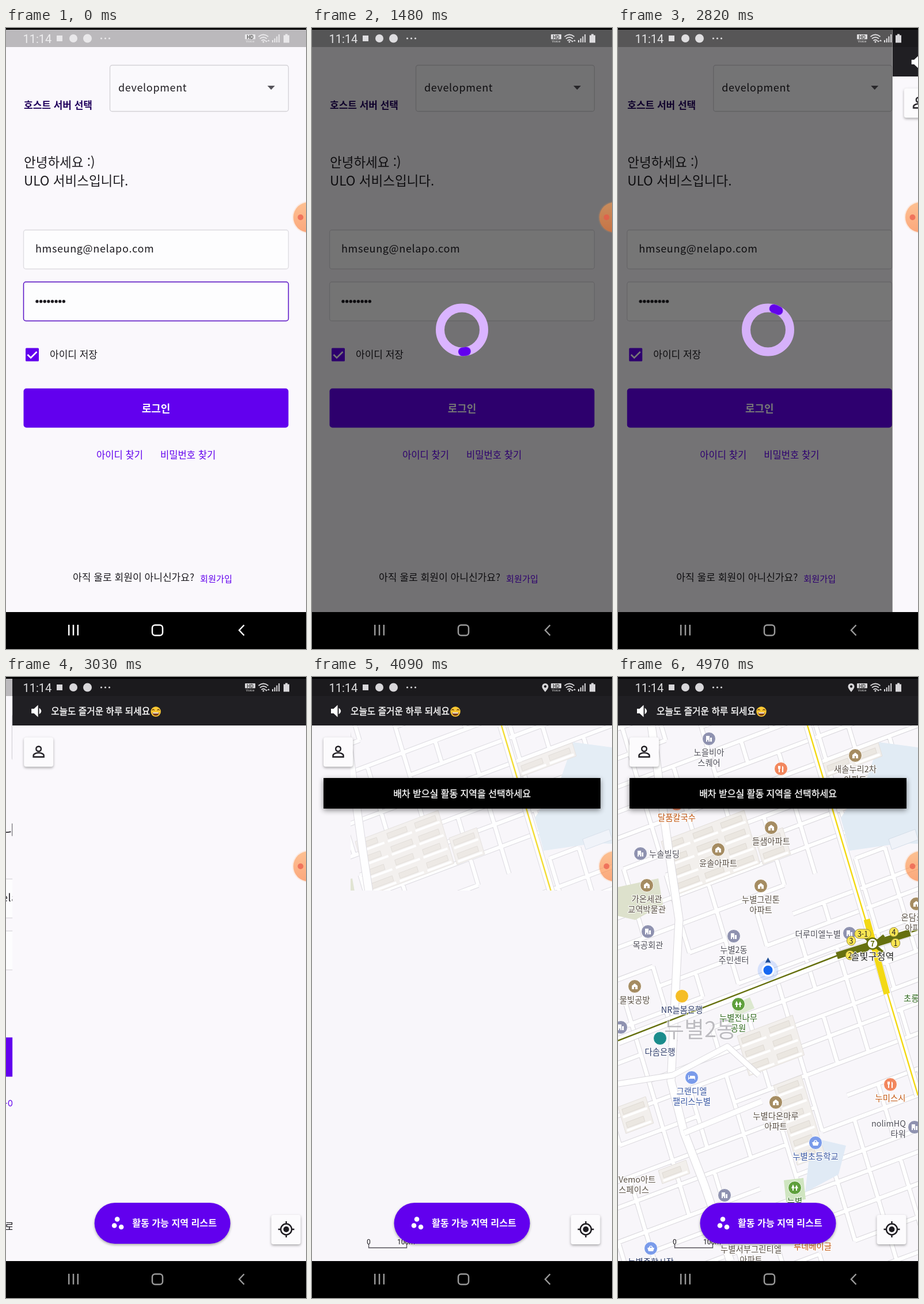
An HTML page that plays this animation: 521x1076 px, repeating every 6.3 s.

```html
<!DOCTYPE html>
<html lang="ko">
<head>
<meta charset="utf-8">
<title>Login</title>
<style>
html, body { margin: 0; width: 100%; height: 100%; overflow: hidden; background: #000; }
svg { display: block; width: 100vw; height: 100vh; }
text { font-family: "Noto Sans CJK KR", "Noto Sans CJK JP", "Noto Sans CJK", sans-serif; fill: #1d1b20; }
.mid { text-anchor: middle; }
.b { font-weight: 700; }
.link { fill: #6200ee; font-weight: 500; }
.light { fill: #fff; stroke: #fff; stroke-width: .35px; font-weight: 500; }
.field { fill: #fdfdfe; stroke: #dddbe0; stroke-width: 1.3; }
.card { fill: #fcfbfd; filter: drop-shadow(0 2px 2px #0005); }
.label text { font-size: 14.4px; font-weight: 500; paint-order: stroke; stroke: #fffc; stroke-width: 2.5px; stroke-linejoin: round; }

#login, #home, #dim, #ring, #spin, #arc, #ripple, #focus, #caret, #nav, .late, .pop, #map, #labels, .cover {
  animation: 6300ms linear infinite;
}
#login { animation-name: push-out; }
#home { animation-name: push-in; }
#dim { animation-name: dim; }
#ring { animation-name: ring; }
#spin { animation-name: spin; transform-origin: 260.5px 523px; }
#arc { animation-name: arc; }
#ripple { animation-name: ripple; }
#focus { animation-name: blur; }
#caret { animation-name: caret; }
#nav { animation-name: nav; }
.late { animation-name: late; }
.pop { animation-name: pop; }
#map { animation-name: map; }
#labels { animation-name: labels; }
.cover { animation-name: uncover; fill: #f8f6fa; }

@keyframes push-in {
  0%, 44.619% { transform: translateX(521px); animation-timing-function: cubic-bezier(.35,.91,.33,.97); }
  49.492%, 100% { transform: none; }
}
@keyframes push-out {
  0%, 44.619% { transform: none; animation-timing-function: cubic-bezier(.35,.91,.33,.97); }
  49.492%, 100% { transform: translateX(-173.7px); }
}
@keyframes dim {
  0%, 4.556% { opacity: 0; animation-timing-function: ease; }
  6.937%, 44.444% { opacity: .54; animation-timing-function: cubic-bezier(.75,0,.75,.9); }
  46.825%, 100% { opacity: 0; }
}
@keyframes ring {
  0%, 4.556% { opacity: 0; animation-timing-function: ease-out; }
  6.937%, 44.444% { opacity: 1; animation-timing-function: ease-in; }
  46.825%, 100% { opacity: 0; }
}
@keyframes spin {
  0%, 4.492% { transform: rotate(0deg); }
  26.149% { transform: rotate(305.9deg); }
  26.15% { transform: rotate(575.9deg); }
  47.806%, 100% { transform: rotate(881.8deg); }
}
@keyframes arc {
  0%, 4.492%, 26.15% { stroke-dasharray: 0 360; stroke-dashoffset: 0; animation-timing-function: cubic-bezier(.4,0,.2,1); }
  15.321%, 36.978% { stroke-dasharray: 270 360; stroke-dashoffset: 0; animation-timing-function: cubic-bezier(.4,0,.2,1); }
  26.149%, 47.806%, 100% { stroke-dasharray: 0 360; stroke-dashoffset: -270; }
}
@keyframes ripple {
  0%, 4.556% { r: 70px; opacity: 0; animation-timing-function: ease; }
  8.127% { r: 237px; opacity: .24; }
  10.556%, 100% { r: 237px; opacity: 0; }
}
@keyframes blur {
  0%, 4.556% { opacity: 1; animation-timing-function: cubic-bezier(.4,0,.2,1); }
  7.206%, 100% { opacity: 0; }
}
@keyframes caret { 0%, 1.42% { opacity: 0; } 1.428%, 4.75% { opacity: 1; } 4.76%, 100% { opacity: 0; } }
@keyframes nav { 0%, 17.46% { opacity: 1; } 20.6%, 100% { opacity: .6; } }
@keyframes late { 0%, 55.86% { opacity: 0; } 55.87%, 100% { opacity: 1; } }
@keyframes pop { 0%, 55.6% { opacity: 0; animation-timing-function: ease; } 60%, 100% { opacity: 1; } }
@keyframes map { 0%, 64.9% { opacity: 0; } 64.91% { opacity: .85; } 67.5%, 100% { opacity: 1; } }
@keyframes uncover { 0%, 65.8% { opacity: 1; } 68.2%, 100% { opacity: 0; } }
@keyframes labels { 0%, 72% { opacity: 0; } 78.8%, 100% { opacity: 1; } }
</style>
</head>
<body>
<svg viewBox="0 0 521 1076" preserveAspectRatio="none">
  <defs>
    <clipPath id="btn"><rect x="30.5" y="624.5" width="460" height="68" rx="5"/></clipPath>
    <clipPath id="area"><rect y="84" width="521" height="928"/></clipPath>
    <linearGradient id="peach" x2="0" y2="1">
      <stop stop-color="#ff9e50"/><stop offset="1" stop-color="#fb7026"/>
    </linearGradient>
  </defs>

  <g id="login">
    <rect width="521" height="1012" fill="#faf8fc"/>
    <rect width="521" height="33" fill="#bbb9bc"/>
    <rect x="180.5" y="64.5" width="310" height="80" rx="4" fill="#faf9fc" stroke="#d3d1d6" stroke-width="1.3"/>
    <text x="195" y="110" font-size="18" letter-spacing=".65">development</text>
    <path d="M454 100h13l-6.500 7z" fill="#55535a"/>
    <text class="b" x="31" y="139.500" font-size="17" style="fill:#21005d">호스트 서버 선택</text>
    <text x="31" y="240.500" font-size="22.500">안녕하세요 :)</text>
    <text x="31" y="272.500" font-size="22.500">ULO 서비스입니다.</text>
    <rect class="field" x="30.500" y="350" width="460" height="67.500" rx="4"/>
    <text x="51" y="389" font-size="18" letter-spacing=".65">hmseung@nelapo.com</text>
    <rect class="field" x="30.500" y="440" width="460" height="67.500" rx="4"/>
    <rect id="focus" x="30.500" y="440" width="460" height="67.500" rx="4" fill="none" stroke="#5a10c8" stroke-width="1.500"/>
    <path d="M54 473.700h47" stroke="#1d1b20" stroke-width="5.400" stroke-linecap="round" stroke-dasharray="0 6.620"/>
    <rect id="caret" x="103.500" y="461" width="2" height="24" fill="#6200ee"/>
    <rect x="34" y="554.500" width="23" height="23" rx="1.500" fill="#6200ee"/>
    <path d="M37.500 566l5.500 5.500 10.500-10.500" fill="none" stroke="#fff" stroke-width="2.600"/>
    <text x="76" y="572" font-size="17">아이디 저장</text>
    <g clip-path="url(#btn)">
      <rect x="30" y="624" width="461" height="69" fill="#6200ee"/>
      <circle id="ripple" cx="269" cy="658" r="70" fill="#fff" opacity="0"/>
    </g>
    <text class="mid b" x="260.500" y="665.500" font-size="18" style="fill:#fff">로그인</text>
    <text class="link" x="157" y="746" font-size="16.600">아이디 찾기</text>
    <text class="link" x="268" y="746" font-size="16.600">비밀번호 찾기</text>
    <text x="116" y="957.500" font-size="17.100">아직 울로 회원이 아니신가요?</text>
    <text class="link" x="337" y="959.500" font-size="15.200">회원가입</text>
  </g>

  <rect id="dim" width="521" height="1012" opacity="0"/>
  <g id="ring" fill="none" stroke-width="15" opacity="0">
    <circle cx="260.500" cy="523" r="38" stroke="#dab4ff"/>
    <g id="spin">
      <circle id="arc" cx="260.500" cy="523" r="38" stroke="#6200ee" stroke-linecap="round" pathLength="360" transform="rotate(-90 260.5 523)"/>
    </g>
  </g>

  <g id="home">
    <rect width="521" height="1012" fill="#faf8fc"/>
    <rect class="pop" y="84" width="521" height="928" fill="#f8f6fa"/>
    <g clip-path="url(#area)">
      <g id="map">
        <g id="ground"></g>
        <rect class="cover" y="33" width="67" height="337" style="animation-delay:60ms"/>
        <rect class="cover" x="67" y="370" width="454" height="454"/>
        <rect class="cover" y="370" width="67" height="454" style="animation-delay:120ms"/>
        <rect class="cover" x="67" y="824" width="454" height="188" style="animation-delay:180ms"/>
        <rect class="cover" y="824" width="67" height="188" style="animation-delay:240ms"/>
      </g>
      <g id="labels"></g>
      <g class="pop">
        <path d="M98.500 983v6h66v-6" fill="none" stroke="#55535a" stroke-width="1.400"/>
        <text x="95" y="983" font-size="12" style="font-family:Roboto,sans-serif">0</text>
        <text x="148" y="983" font-size="12" style="font-family:Roboto,sans-serif">100m</text>
      </g>
    </g>
    <rect class="card" x="20" y="104.500" width="51" height="51" rx="4"/>
    <g fill="none" stroke="#1d1b20" stroke-width="2.400">
      <circle cx="45.500" cy="124.500" r="4.300"/>
      <path d="M36.500 138.500v-2.500c0-3 5-4.600 9-4.600s9 1.600 9 4.600v2.500z"/>
    </g>
    <g class="pop">
      <rect x="20" y="175" width="481" height="53" style="filter:drop-shadow(0 3px 5px #0007)"/>
      <text class="mid light" x="260.500" y="208" font-size="16">배차 받으실 활동 지역을 선택하세요</text>
    </g>
    <rect x="142.500" y="911" width="236" height="71" rx="35.500" fill="#6200ee" style="filter:drop-shadow(0 2px 2px #0005)"/>
    <g fill="#fff"><circle cx="182" cy="939.500" r="4.300"/><circle cx="177" cy="950.500" r="4.300"/><circle cx="189" cy="953" r="4.300"/></g>
    <text class="b" x="208" y="952" font-size="16.100" style="fill:#fff">활동 가능 지역 리스트</text>
    <rect class="card" x="449.500" y="932" width="51" height="51" rx="4"/>
    <circle cx="475.500" cy="957" r="5" fill="#1d1b20"/>
    <path d="M485 957a9.500 9.500 0 1 0-19 0a9.500 9.500 0 1 0 19 0M475.500 943v5M475.500 966v5M461.500 957h5M484.500 957h5" fill="none" stroke="#1d1b20" stroke-width="2.400"/>
    <rect width="521" height="84" fill="#201f23"/>
    <rect width="521" height="33" fill="#1b1a1d"/>
    <path d="M33 55h4.500l7-6.500v21l-7-6.500h-4.500zM46.500 53.500q7.500 5.500 0 11z" fill="#fff"/>
    <text class="light" x="67" y="65" font-size="15.700">오늘도 즐거운 하루 되세요</text>
    <circle cx="249" cy="60" r="8.700" fill="#fbc832"/>
    <path d="M242.500 58q2-3.500 4 0M251.500 58q2-3.500 4 0" fill="none" stroke="#6b3f12" stroke-width="1.300"/>
    <path d="M243 61.500h12q-1 5.500-6 5.500t-6-5.500z" fill="#7a3b16"/>
    <path d="M244 61.500h10v1.700h-10z" fill="#fff"/>
  </g>

  <g fill="#efeef0" opacity=".9">
    <text x="29.500" y="25.500" font-size="20" style="font-family:Roboto,sans-serif;fill:#f4f4f5">11:14</text>
    <rect x="88" y="13" width="10" height="10"/>
    <circle cx="117" cy="18" r="7"/>
    <circle cx="141.500" cy="18" r="7.500"/>
    <circle cx="165.500" cy="18" r="1.600"/><circle cx="172.500" cy="18" r="1.600"/><circle cx="179.500" cy="18" r="1.600"/>
    <rect x="415" y="11" width="18" height="8.500" rx="1"/>
    <text class="mid b" x="424" y="18.500" font-size="8.500" style="font-family:Roboto,sans-serif;fill:#555">HD</text>
    <text class="mid" x="424" y="25" font-size="6" style="font-family:Roboto,sans-serif;fill:#eee">Voice</text>
    <path d="M438.500 15q8.500-7 17 0M441 18.500q6-5 12 0M443.500 22q3.500-3 7 0" fill="none" stroke="#efeef0" stroke-width="1.700"/>
    <circle cx="447" cy="24" r="1.500"/>
    <path d="M450 22h4l-2 3zM454 23h4l-2-3z"/>
    <path d="M462 21h2v4h-2zM465.700 18h2v7h-2zM469.400 14.500h2v10.500h-2zM473.200 11h2v14h-2z"/>
    <path d="M482 12.500h3v-2h4v2h3v13h-10z"/>
    <path class="late" fill-rule="evenodd" d="M405 26c-4-5-5.500-7-5.500-9.500a5.500 5.500 0 0 1 11 0c0 2.500-1.500 4.500-5.500 9.500zM405 14.300a2.200 2.200 0 1 0 .1 0z"/>
  </g>

  <circle cx="525" cy="328" r="28" fill="#ff9a50" opacity=".14"/>
  <circle cx="525" cy="328" r="26" fill="url(#peach)" opacity=".55"/>
  <circle cx="511.500" cy="328" r="5" fill="#ea5748" opacity=".7"/>

  <rect width="521" height="3"/>
  <rect y="1012" width="521" height="64"/>
  <g id="nav" fill="none" stroke="#fff" stroke-width="2.500">
    <path d="M109.200 1034v18.500M117 1034v18.500M124.800 1034v18.500"/>
    <rect x="254" y="1034.500" width="18" height="18" rx="5"/>
    <path d="M413.500 1034.500l-8.500 9 8.500 9"/>
  </g>
</svg>

<script>
const $ = id => document.getElementById(id);
let seed = 11;
const rnd = () => (seed = seed * 16807 % 2147483647) / 2147483647;

// Skewed street axes: u runs along the green line, v along the yellow one.
const pt = (u, v, x = 442, y = 462) => `${(x + u + .3 * v).toFixed(1)} ${(y - .375 * u + v).toFixed(1)}`;
const quad = (x, y, w, h, fill, line = 'none') =>
  `<path d="M${pt(0, 0, x, y)}L${pt(w, 0, x, y)}L${pt(w, h, x, y)}L${pt(0, h, x, y)}Z" fill="${fill}" stroke="${line}"/>`;
const line = (d, color, w) => `<path d="${d}" fill="none" stroke="${color}" stroke-width="${w}" stroke-linejoin="round"/>`;
const road = (d, w) => line(d, '#d9d7dc', w + 2) + line(d, '#fff', w);
const area = (d, fill) => `<path d="M${d}Z" fill="${fill}"/>`;

const steps = (from, to, min, vary) => {
  const list = [];
  for (let p = from; p < to; p += min + rnd() * vary) list.push(p);
  return list;
};

function streets() {
  const us = steps(-700, 330, 46, 34), vs = steps(-620, 720, 34, 22);
  let d = '';
  us.forEach((u, i) => vs.forEach((v, j) => {
    if (i && rnd() < .86) d += `M${pt(us[i - 1], v)}L${pt(u, v)}`;
    if (j && rnd() < .72) d += `M${pt(u, vs[j - 1])}L${pt(u, v)}`;
  }));
  return road(d, 6.5);
}

function estate(x, y, cols, rows) {
  let s = quad(x, y, cols * 48, rows * 23, '#f2efec', '#e3dfdb');
  for (let i = 0; i < cols; i++) for (let j = 0; j < rows; j++) {
    const u = i * 48 + 5, v = j * 23 + 6, bx = x + u + .3 * v, by = y - .375 * u + v;
    s += line(`M${pt(-2, 13, bx, by)}L${pt(40, 13, bx, by)}`, '#fff', 4);
    s += quad(bx, by, 28 + rnd() * 9, 9, '#ebe7e1', '#dfdad4');
  }
  return s;
}

const green = '#66700f', yellow = '#f3d915';
$('ground').innerHTML =
  '<rect y="84" width="521" height="928" fill="#f8f6fa"/>' + streets() +
  area('454 113L521 122V289L492 288L402 301L387 244L432 176', '#e1ebf4') +
  quad(470, 281, 46, 18, '#eff2f8', '#d3dde8') +
  area('336 798L396 812L383 862L325 893', '#e0eaf5') +
  area('0 364L70 349L78 394L30 421L0 414', '#dde1cc') +
  area('198 569L229 555L237 574L204 588', '#dce8cf') +
  area('288 872L322 868L326 905L292 910', '#cfe5c0') +
  [[75, 285, 3, 4], [207, 622, 2, 3], [270, 708, 1, 6], [356, 150, 2, 1], [238, 279, 1, 2], [0, 745, 1, 2], [70, 855, 1, 1]]
    .map(e => estate(...e)).join('') +
  road('M58 84L88 300L106 420L99 560L92 700L115 790L150 880L195 1012', 13) +
  road('M0 705L95 690L190 640L245 690M115 790L250 735', 9) +
  road('M0 631L380 484L521 437', 15) +
  road('M329 84L521 725', 12) +
  line('M0 630L380 483L521 438', green, 2.5) + line('M329 84L521 725', yellow, 2.5) +
  line('M432 420L467 549', yellow, 11) + line('M380 483L507 443', green, 12) +
  line('M424 447L460 477M424 479L462 448', green, 5);

const glyphs = {
  home: ['#a58c62', 'M-5-1L0-5L5-1V5H1V1H-1V5H-5Z'],
  office: ['#8f92b0', 'M-5 5V-5H1V5H-1V2H-3V5ZM2 5V-2H5V5Z'],
  food: ['#f2875e', 'M-5-5H-1V0H-2V6H-4V0H-5ZM2-5Q5-4 4 1V6H2Z'],
  tree: ['#5fa03c', 'M-3-6L0 1H-2V5H-4V1H-6ZM3-5L6 1H4V5H2V1H0Z'],
  bed: ['#7a9bea', 'M-6-4H-5V0H-3V-3H4Q6-3 6 0V4H5V2H-5V4H-6Z'],
  shop: ['#7a9bea', 'M-6-1H-4L-1-5L0-4L-2-1H2L0-4L1-5L4-1H6L4 5H-4Z']
};
const icon = (x, y, kind) => {
  const [fill, d] = glyphs[kind] || [kind, ''];
  return `<g transform="translate(${x} ${y})"><circle r="11.5" fill="${fill}" stroke="#fff" stroke-width="1"/><path d="${d}" fill="#fff"/></g>`;
};
const words = (x, y, lines, color, anchor = 'middle') => lines.split('/').map((s, i) =>
  `<text x="${x}" y="${y + 5.3 + i * 17.5}" text-anchor="${anchor}" style="fill:${color}">${s}</text>`).join('');
const place = (x, y, kind, lines, color) => icon(x, y, kind) + words(x, y + 24, lines, color);
const gray = '#4f4e59', brown = '#594f45', rust = '#c2560f', navy = '#2c3a69', blue = '#3755a2', leaf = '#2d671c';
const exit = (x, y, n) => `<rect x="${x - 4.5 - n.length * 3.2}" y="${y - 8}" width="${9 + n.length * 6.4}" height="16" rx="8" fill="#f8e552" stroke="#9a8e3c"/>
  <text class="mid" x="${x}" y="${y + 4.5}" style="font-size:12.5px;stroke:none">${n}</text>`;

$('labels').setAttribute('class', 'label');
$('labels').innerHTML =
  '<text class="mid" x="143" y="624" style="font-size:38px;fill:#aaa8ae;font-weight:400;opacity:.75">누별2동</text>' +
  [
    [158, 107, 'office', '노을비아/스퀘어', gray],
    [283, 159, 'food', '', rust],
    [412, 136, 'home', '새솔누리2차/아파트', brown],
    [102, 220, 'food', '달품칼국수', rust],
    [266, 261, 'home', '들샘아파트', brown],
    [174, 299, 'home', '윤솔아파트', brown],
    [50, 361, 'home', '가온세관/교역박물관', brown],
    [248, 362, 'home', '누별그린톤/아파트', brown],
    [52, 441, 'office', '목공회관', gray],
    [201, 449, 'office', '누별2동/주민센터', gray],
    [29, 536, 'home', '물빛공방', brown],
    [111, 553, '#f5bd26', 'NR늘봄은행', navy],
    [209, 567, 'tree', '누별전나무/공원', leaf],
    [73, 626, '#1b8c8c', '다솜은행', navy],
    [5, 607, 'office', '', gray],
    [128, 694, 'bed', '그랜디엘/팰리스누별', blue],
    [473, 706, 'food', '누미스시', rust],
    [274, 737, 'home', '누별다온마루/아파트', brown],
    [343, 807, 'shop', '누별초등학교', blue],
    [185, 898, 'office', '', gray],
    [307, 885, 'tree', '누별', leaf],
    [57, 990, 'shop', '누별종합시장', navy],
    [518, 393, 'home', '온담르네/아파트', brown]
  ].map(p => place(...p)).join('') +
  icon(39, 306, 'office') + words(54, 307, '누솔빌딩', gray, 'start') +
  icon(402, 444, 'office') + words(387, 446, '더루미엘누별', gray, 'end') +
  icon(515, 780, 'office') + words(500, 774, 'nolimHQ/타워', gray, 'end') +
  words(1, 871, 'Vemo아트/스페이스', brown, 'start') +
  words(231, 992, '누별서부그린티엘/아파트', brown) +
  words(338, 987, '루네베이글', rust) +
  words(496, 557, '초롱공원', leaf, 'start') +
  exit(403, 482, '2') + exit(405, 457, '3') + exit(425, 445, '3-1') + exit(479, 442, '4') + exit(482, 461, '1') +
  `<circle cx="442" cy="462" r="9.5" fill="#fff" stroke="${green}" stroke-width="2.5"/>
   <text class="mid" x="442" y="467" style="font-size:13px;font-weight:700;fill:${green}">7</text>
   <text class="mid" x="442" y="490" style="font-size:16.3px;fill:#222">솔빛구청역</text>
   <circle cx="260.5" cy="508" r="18" fill="#4d8dff" opacity=".2"/>
   <path d="M260.5 486l5 9.500q-5-2-10 0z" fill="#1c4c96"/>
   <circle cx="260.5" cy="508" r="9.5" fill="#1769f2" stroke="#fff" stroke-width="3"/>`;
</script>
</body>
</html>
```
